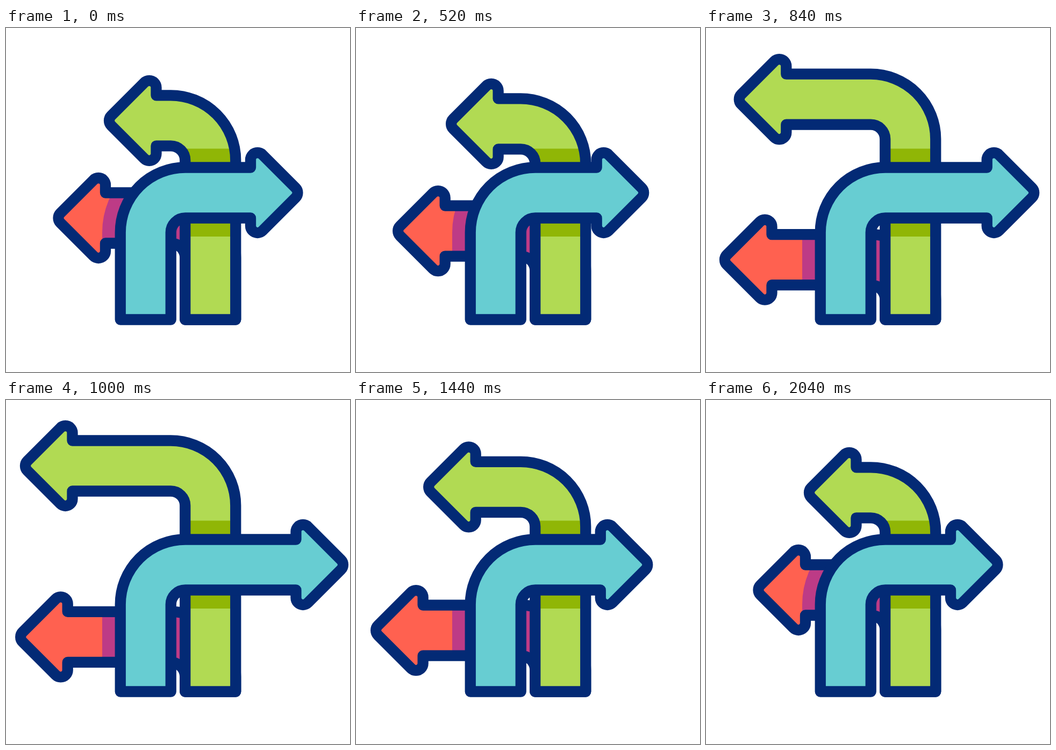
Animation of 640 by 640 pixels, one loop 2200 ms. Source, as an HTML page with a canvas:

```html
<!DOCTYPE html>
<html lang="en">
<head>
<meta charset="utf-8">
<title>Arrows</title>
<style>
html, body { margin: 0; width: 100%; height: 100%; overflow: hidden; background: #fff; }
canvas { display: block; width: 640px; height: 640px; }
</style>
</head>
<body>
<canvas id="stage" width="640" height="640"></canvas>
<script>
const ctx = document.getElementById('stage').getContext('2d');
const LOOP = 2200, STEP = 40, SIZE = 640;
const NAVY = '#032a75';
const PI = Math.PI;

// Sine ease from 0 to 1 between two times.
function ramp(t, from, to) {
  const s = Math.min(1, Math.max(0, (t - from) / (to - from)));
  return (1 - Math.cos(PI * s)) / 2;
}

// Rises over [a, b], holds, falls over [c, d].
const pulse = (t, a, b, c, d) => ramp(t, a, b) - ramp(t, c, d);

// A bent arrow that points right; reach is the x of the head's back edge.
function arrowPath(reach, axis) {
  const p = new Path2D();
  const cx = 333.5, cy = axis + 73.75, outer = 120.75, inner = 26.75;
  const half = 47, wing = 61.5, nub = 13, foot = 542.5;
  p.moveTo(cx - outer, foot);
  p.lineTo(cx - outer, cy);
  p.arc(cx, cy, outer, PI, 1.5 * PI);
  p.lineTo(reach, axis - half);
  p.arc(reach + nub, axis - wing, nub, PI, 1.75 * PI);
  p.arc(reach + nub + wing, axis, nub, -PI / 4, PI / 4);
  p.arc(reach + nub, axis + wing, nub, PI / 4, PI);
  p.lineTo(reach, axis + half);
  p.arc(cx, cy, inner, 1.5 * PI, PI, true);
  p.lineTo(cx - inner, foot);
  p.closePath();
  return p;
}

// Shadows of the front arrow, in the flipped space of the arrows behind it.
function bandShade() {
  const p = new Path2D();
  p.rect(0, 224.5, 340, 163.5);
  return p;
}

function bendShade() {
  const p = new Path2D();
  p.moveTo(461, SIZE);
  p.arc(306.5, 380.25, 154.5, 0, -PI / 2, true);
  p.lineTo(0, 225.75);
  p.lineTo(0, SIZE);
  p.closePath();
  return p;
}

const band = bandShade(), bend = bendShade();

function drawArrow(reach, axis, color, { flip = false, shade, shadeColor } = {}) {
  const path = arrowPath(reach, axis);
  ctx.save();
  if (flip) {
    ctx.translate(SIZE, 0);
    ctx.scale(-1, 1);
  }
  ctx.fillStyle = color;
  ctx.fill(path);
  if (shade) {
    ctx.save();
    ctx.clip(path);
    ctx.fillStyle = shadeColor;
    ctx.fill(shade);
    ctx.restore();
  }
  ctx.strokeStyle = NAVY;
  ctx.lineWidth = 20.3;
  ctx.lineJoin = 'round';
  ctx.stroke(path);
  ctx.restore();
}

function draw(t) {
  const dip = pulse(t, 200, 400, 1600, 2000);
  const blue = pulse(t, 400, 1000, 1000, 1600);
  const green = pulse(t, 400, 1000, 1205, 1605);
  const red = 0.95 * pulse(t, 260, 1000, 1310, 1840) + 0.05 * pulse(t, 1000, 1155, 1155, 1310);

  ctx.fillStyle = '#fff';
  ctx.fillRect(0, 0, SIZE, SIZE);
  drawArrow(455 + 74 * red, 353.5 + 92 * red, '#ff6150',
    { flip: true, shade: bend, shadeColor: '#bd3b86' });
  drawArrow(360.5 + 156 * green, 172.3 + 12 * dip - 61.8 * green, '#b1da53',
    { flip: true, shade: band, shadeColor: '#90b606' });
  drawArrow(455 - 17 * dip + 101.5 * blue, 306.5, '#67cdd2');
}

const start = performance.now();
function tick() {
  const t = (performance.now() - start) % LOOP;
  draw(Math.floor(t / STEP) * STEP);
  requestAnimationFrame(tick);
}
tick();
</script>
</body>
</html>
```
